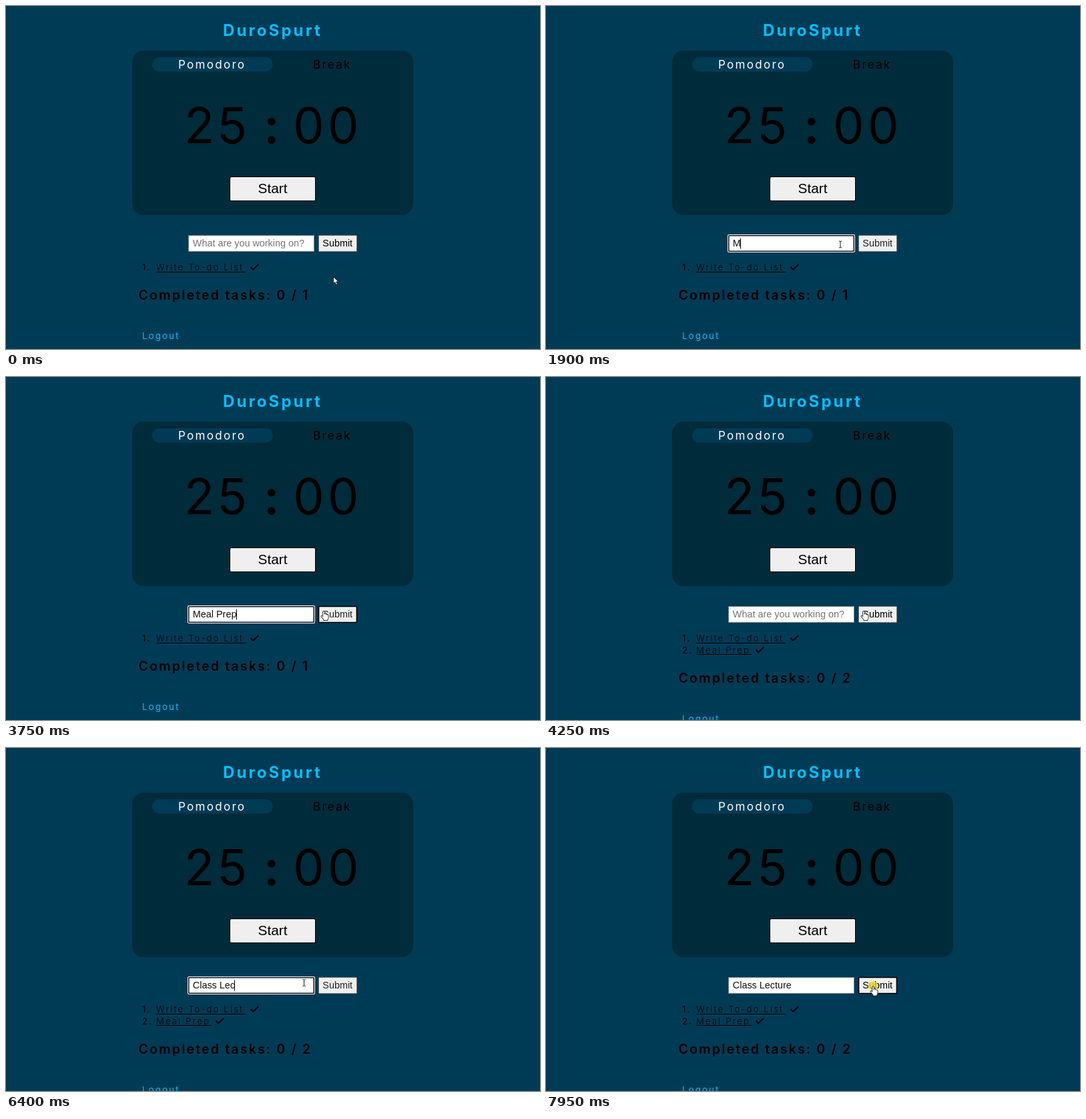
These frames come from a looping animation (800 by 515 pixels, 8 s). An HTML page:

```html
<!DOCTYPE html>
<html lang="en">
<head>
<meta charset="utf-8">
<title>Pomodoro timer</title>
<style>
  html, body { margin: 0; width: 100%; height: 100%; overflow: hidden; background: #003b56; }
  svg { display: block; width: 800px; height: 515px; }
  text { white-space: pre; }
  .page { font-family: Inter, sans-serif; }
  .title { font-size: 24px; font-weight: 700; letter-spacing: 3.1px; fill: #00bfff; }
  .tab { font-size: 17px; letter-spacing: 2.3px; }
  .clock { font-size: 74px; letter-spacing: 5px; }
  .item { font-size: 13px; letter-spacing: 2.2px; }
  .total { font-size: 19.5px; font-weight: 600; letter-spacing: 2.18px; }
  .logout { font-size: 13.3px; letter-spacing: 2.1px; fill: #00bfff; }
  .form { font: 14.4px "Liberation Sans", Arial, sans-serif; }
  .line { fill: none; stroke: #000; }
  .cursor { fill: #fff; stroke: #000; stroke-width: .8; stroke-linejoin: round; }
</style>
</head>
<body>
<svg viewBox="0 0 800 515">
  <g class="page">
    <text class="title" x="325" y="45">DuroSpurt</text>
    <rect x="189" y="67" width="421" height="247" rx="17" fill="#002b3a"/>
    <rect x="219" y="77" width="180.500" height="21.500" rx="10.700" fill="#003b56"/>
    <text class="tab" x="258" y="94" fill="#fff">Pomodoro</text>
    <text class="tab" x="460" y="94">Break</text>
    <g class="clock">
      <text x="267" y="206">25</text>
      <text x="386" y="206" font-weight="600">:</text>
      <text x="430" y="206">00</text>
    </g>
    <g class="item">
      <text x="204" y="397">1.</text>
      <text x="225" y="397" font-weight="300">Write To-do List</text>
      <path class="line" d="M225 399.500H359"/>
      <path class="line" stroke-width="1.900" d="M366.500 392l3.700 4 8-8"/>
    </g>
    <g class="item" id="second">
      <text x="204" y="414.500">2.</text>
      <text x="225" y="414.500" font-weight="300">Meal Prep</text>
      <path class="line" d="M225 416.500H308"/>
      <path class="line" stroke-width="1.900" d="M314.500 409.500l3.700 4 8-8"/>
    </g>
    <g id="footer">
      <text class="total" id="total" x="198.500" y="441"></text>
      <text class="logout" x="204" y="500">Logout</text>
    </g>
  </g>

  <g class="form">
    <rect x="335" y="256" width="129" height="37" rx="2.500"/>
    <rect x="336" y="257" width="127" height="35" rx="1.500" fill="#efefef"/>
    <text x="399.500" y="281" text-anchor="middle" font-size="20.800">Start</text>

    <rect id="plainBox" x="273.500" y="344.500" width="188" height="24" fill="#fff" stroke="#71808a"/>
    <g id="focusBox">
      <rect x="272" y="343" width="191" height="27" rx="2" fill="#fff"/>
      <rect x="273" y="344" width="189" height="25" rx="1.500" fill="#101010"/>
      <rect x="274.500" y="345.500" width="186" height="22" fill="#fff"/>
    </g>
    <text id="entry" x="279.800" y="361"></text>
    <path id="caret" class="line" d="M0 348.500V364.500"/>

    <rect id="submitBox" x="468.500" y="344.500" width="57" height="24" rx="1" fill="#efefef"/>
    <text id="submitText" x="474.300" y="361">Submit</text>
  </g>

  <g id="popup">
    <path d="M344 376.500l6.500-6 6.500 6.500" fill="#2b2b2b"/>
    <rect x="337" y="376" width="63" height="28" rx="2" fill="#2b2b2b"/>
    <text x="344.500" y="393" font-family="Open Sans, sans-serif" font-size="8.200" fill="#fff">Meal Prep</text>
  </g>

  <circle id="click" r="7.500" fill="#e6dc2c" fill-opacity=".8"/>
  <g id="pointer">
    <path id="arrow" class="cursor" d="M0 0V10.200L2.400 8 4.100 12 5.900 11.200 4.200 7.400H7.300Z"/>
    <path id="beam" class="line" stroke-width=".9" d="M-2.200-5Q0-5 0-4Q0-5 2.200-5M0-4V4M-2.200 5Q0 5 0 4Q0 5 2.200 5"/>
    <path id="hand" class="cursor" d="M-1.300 1Q0-.7 1.300 1V5.300Q3-.2 3.600 5.500Q4.800 4.800 5.300 6Q7 5.600 7 7.400V10.500Q7 12 6 13V14.500H-.2V13L-4 8.600Q-4.300 7-2.800 7.300L-1.300 8.700Z"/>
  </g>
</svg>
<script>
  const LOOP = 8000, STEP = 50;
  const $ = id => document.getElementById(id);
  const show = (id, on) => $(id).setAttribute("visibility", on ? "visible" : "hidden");
  const within = (t, spans) => spans.some(([from, to]) => t >= from && t < to);

  // Time of each key press, in ms.
  const entries = [
    { text: "Meal Prep", clear: 4250, keys: [1900, 2100, 2150, 2250, 2300, 2500, 2650, 2750, 2800] },
    { text: "Class Lecture", clear: LOOP,
      keys: [5500, 5600, 5700, 5850, 5950, 6100, 6200, 6300, 6400, 6550, 6650, 6700, 6800] }
  ];
  const added = 4250;
  const focused = [[1050, 3850], [4850, 7950]];
  const caretOff = [[1550, 1900], [3200, 3700], [5250, 5500], [7250, 7950]];
  const clicks = [[1050, 1150], [3850, 3950], [4850, 4900], [7950, LOOP]];
  const popup = [[4900, 5550]];

  // Pointer moves: start, end, from, to.
  const moves = [
    [700, 1000, [490.5, 406.5], [441, 358]],
    [3500, 3750, [441, 358], [476, 351]],
    [4400, 4700, [476, 351], [446.5, 352.5]],
    [7150, 7600, [446.5, 352.5], [490, 357.5]]
  ];

  function pointerAt(t) {
    let point = moves[0][2];
    for (const [start, end, from, to] of moves) {
      if (t < start) break;
      const p = Math.min(1, (t - start) / (end - start));
      const eased = p * p * (3 - 2 * p);
      point = from.map((v, i) => v + (to[i] - v) * eased);
    }
    return point;
  }

  function pointerKind([x, y]) {
    if (y < 345 || y > 369) return "arrow";
    if (x >= 273 && x <= 462) return "beam";
    return x >= 468 && x <= 526 ? "hand" : "arrow";
  }

  function typedAt(t) {
    const entry = entries.find(e => t >= e.keys[0] && t < e.clear);
    return entry ? entry.text.slice(0, entry.keys.filter(k => k <= t).length) : "";
  }

  function drawForm(t, kind) {
    const typed = typedAt(t), focus = within(t, focused);
    const entry = $("entry");
    entry.textContent = typed || "What are you working on?";
    entry.setAttribute("fill", typed ? "#111" : "#757575");
    show("plainBox", !focus);
    show("focusBox", focus);
    const width = typed ? entry.getComputedTextLength() : 0;
    $("caret").setAttribute("transform", `translate(${Math.floor(279.8 + width) + .5} 0)`);
    show("caret", focus && !within(t, caretOff));

    const reloaded = t >= added && t < 4450;
    const active = kind === "hand" && !reloaded;
    $("submitBox").setAttribute("stroke", active ? "#000" : "#777");
    $("submitBox").setAttribute("stroke-width", active ? 1.7 : 1);
    $("submitText").setAttribute("fill", focus ? "#222" : "#000");
    show("popup", within(t, popup));
  }

  function drawList(t) {
    const two = t >= added;
    show("second", two);
    $("total").textContent = `Completed tasks: 0 / ${two ? 2 : 1}`;
    $("footer").setAttribute("transform", `translate(0 ${two ? 17.5 : 0})`);
  }

  function drawPointer(t, point, kind) {
    const place = `translate(${point})`;
    $("pointer").setAttribute("transform", place);
    $("click").setAttribute("transform", place);
    show("click", within(t, clicks));
    for (const id of ["arrow", "beam", "hand"]) show(id, id === kind);
  }

  function render(now) {
    const t = Math.floor((now % LOOP) / STEP) * STEP;
    const point = pointerAt(t), kind = pointerKind(point);
    drawForm(t, kind);
    drawList(t);
    drawPointer(t, point, kind);
  }

  const begin = performance.now();
  function tick() {
    render(performance.now() - begin);
    requestAnimationFrame(tick);
  }
  tick();
</script>
</body>
</html>
```
